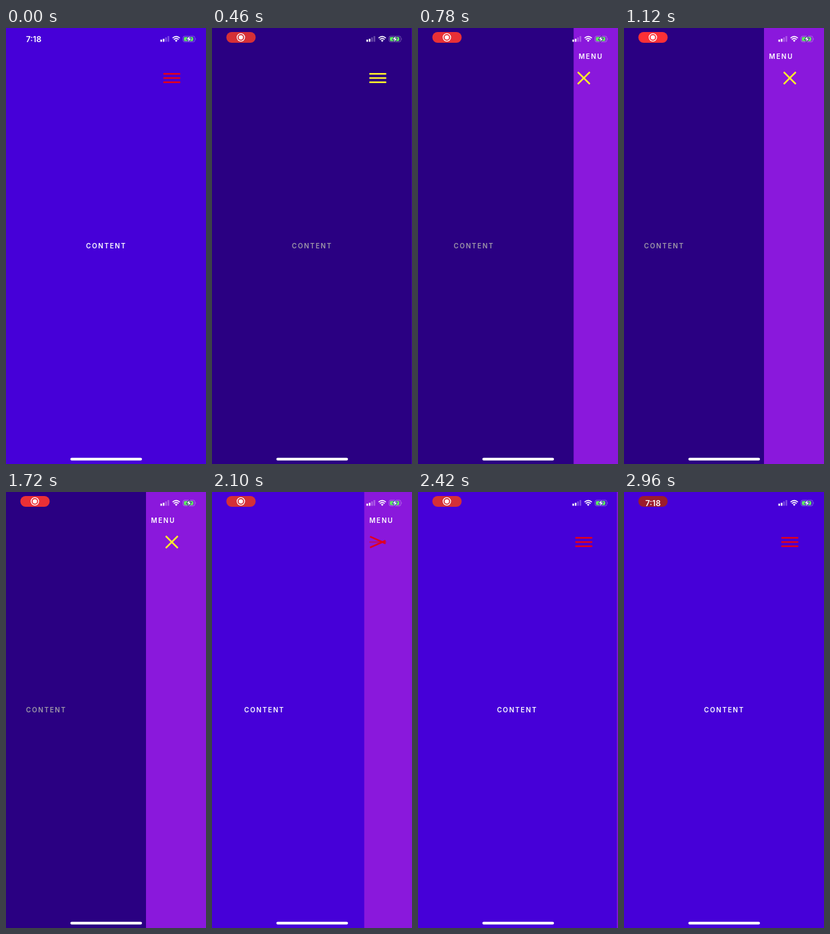
An HTML page that plays this animation: 300 px wide and 649 px high, repeating every 2.98 s.

```html
<!DOCTYPE html>
<html lang="en">
<head>
<meta charset="utf-8">
<style>
html, body { margin: 0; width: 100%; height: 100%; overflow: hidden; background: #4600d8; }
svg { display: block; width: 100%; height: 100%; }
text { font-family: Inter, Roboto, "Liberation Sans", sans-serif; font-weight: 600; fill: #fff; }
.label { font-size: 10px; letter-spacing: 1.6px; }
</style>
</head>
<body>
<svg viewBox="0 0 300 649">
  <g id="page">
    <rect id="bg" width="301" height="649"/>
    <text id="content" class="label" x="120" y="328.2">CONTENT</text>
    <g transform="translate(300)">
      <rect width="100" height="649" fill="#8a18dc"/>
      <text class="label" x="7.6" y="46.3">MENU</text>
    </g>
  </g>

  <g id="icon" transform="translate(248.7 74.5)">
    <rect class="bar" x="-12.8" y="-1.25" width="25.6" height="2.5" rx=".8"/>
    <rect class="bar" x="-12.8" y="-1.25" width="25.6" height="2.5" rx=".8"/>
    <rect class="bar" x="-12.8" y="-1.25" width="25.6" height="2.5" rx=".8"/>
  </g>

  <rect id="pill" x="21.5" y="6" width="44" height="16" rx="8"/>
  <text id="clock" y="20.6" font-size="12">7:18</text>
  <g id="record" fill="#fff">
    <circle cx="43.3" cy="14" r="5.6" fill="none" stroke="#fff" stroke-width="1.3"/>
    <circle cx="43.3" cy="14" r="3.2"/>
  </g>

  <g fill="#fff">
    <rect x="231.6" y="17.2" width="2.4" height="3.3" rx=".6"/>
    <rect x="235.2" y="15.9" width="2.4" height="4.6" rx=".6"/>
    <g opacity=".3">
      <rect x="238.8" y="14" width="2.4" height="6.5" rx=".6"/>
      <rect x="242.4" y="12" width="2.4" height="8.5" rx=".6"/>
    </g>
    <path d="M253.3 18.6Q255.3 17 257.3 18.6L255.3 20.7Z"/>
  </g>
  <path d="M249.8 15Q255.3 10.4 260.8 15M251.7 17.1Q255.3 14.2 258.9 17.1" fill="none" stroke="#fff" stroke-width="1.6"/>
  <g id="battery">
    <rect x="265.6" y="12.1" width="17.6" height="8.6" rx="2.4" fill="none" stroke="#fff" stroke-opacity=".4" stroke-width=".8"/>
    <path d="M284.2 15q1.2 1.4 0 2.8z" fill="#fff" opacity=".45"/>
    <rect x="266.9" y="13.4" width="14" height="6" rx="1.3" fill="#5fee62"/>
    <path id="bolt" d="M275.6 11.8L271.3 17h2.6l-.8 4 4.3-5.2h-2.6z" fill="#fff" stroke-width="1.4" paint-order="stroke"/>
  </g>
  <rect x="96.5" y="639.7" width="107.5" height="4" rx="2" fill="#fff"/>
</svg>
<script>
const LOOP = 2980, OPEN = 450, CLOSE = 1955, SLIDE = 500, MORPH = 300;
const $ = id => document.getElementById(id);
const bars = document.querySelectorAll('.bar');
const ramp = (t, start, length) => Math.min(1, Math.max(0, (t - start) / length));
const ease = x => x < .5 ? .5 * (2 * x) ** 1.667 : 1 - .5 * (2 - 2 * x) ** 1.667;
const phase = (t, length) => ease(ramp(t, OPEN, length)) - ease(ramp(t, CLOSE, length));
const set = (el, attrs) => {
  for (const key in attrs) el.setAttribute(key, attrs[key]);
};

function drawMenu(t) {
  const active = t >= OPEN && t < CLOSE;
  const bg = active ? '#2a0082' : '#4600d8';
  set($('page'), { transform: `translate(${-90 * phase(t, SLIDE)})` });
  set($('bg'), { fill: bg });
  set($('content'), { style: `fill:${active ? '#9f98a8' : '#fff'}` });
  set($('bolt'), { stroke: bg });

  const m = phase(t, MORPH);
  set($('icon'), { fill: active ? '#fff02a' : '#e2001c' });
  bars.forEach((bar, i) => {
    const side = i - 1;
    set(bar, {
      transform: `translate(0 ${side * 6.3 * (1 - m)}) rotate(${-side * 45 * m})`,
      opacity: side ? 1 : 1 - m
    });
  });
}

function drawStatus(t) {
  const leaving = ramp(t, 2600, 360);
  const recording = ramp(t, 140, 200) - ramp(t, 2620, 200);
  const shown = ramp(t, 20, 280);
  const pulse = Math.cos((t - 1260) / 1000 * Math.PI);
  const mix = (from, to) => Math.round(from + (to - from) * leaving);
  const red = 232 + 22 * pulse;
  set($('pill'), { fill: `rgb(${mix(red, 156)},${mix(48, 28)},${mix(54, 44)})`, opacity: shown });
  set($('clock'), { x: 30 + 2 * shown, opacity: 1 - recording });
  set($('record'), { opacity: recording });
}

function frame() {
  const t = performance.now() % LOOP;
  drawMenu(t);
  drawStatus(t);
  requestAnimationFrame(frame);
}
frame();
</script>
</body>
</html>
```
